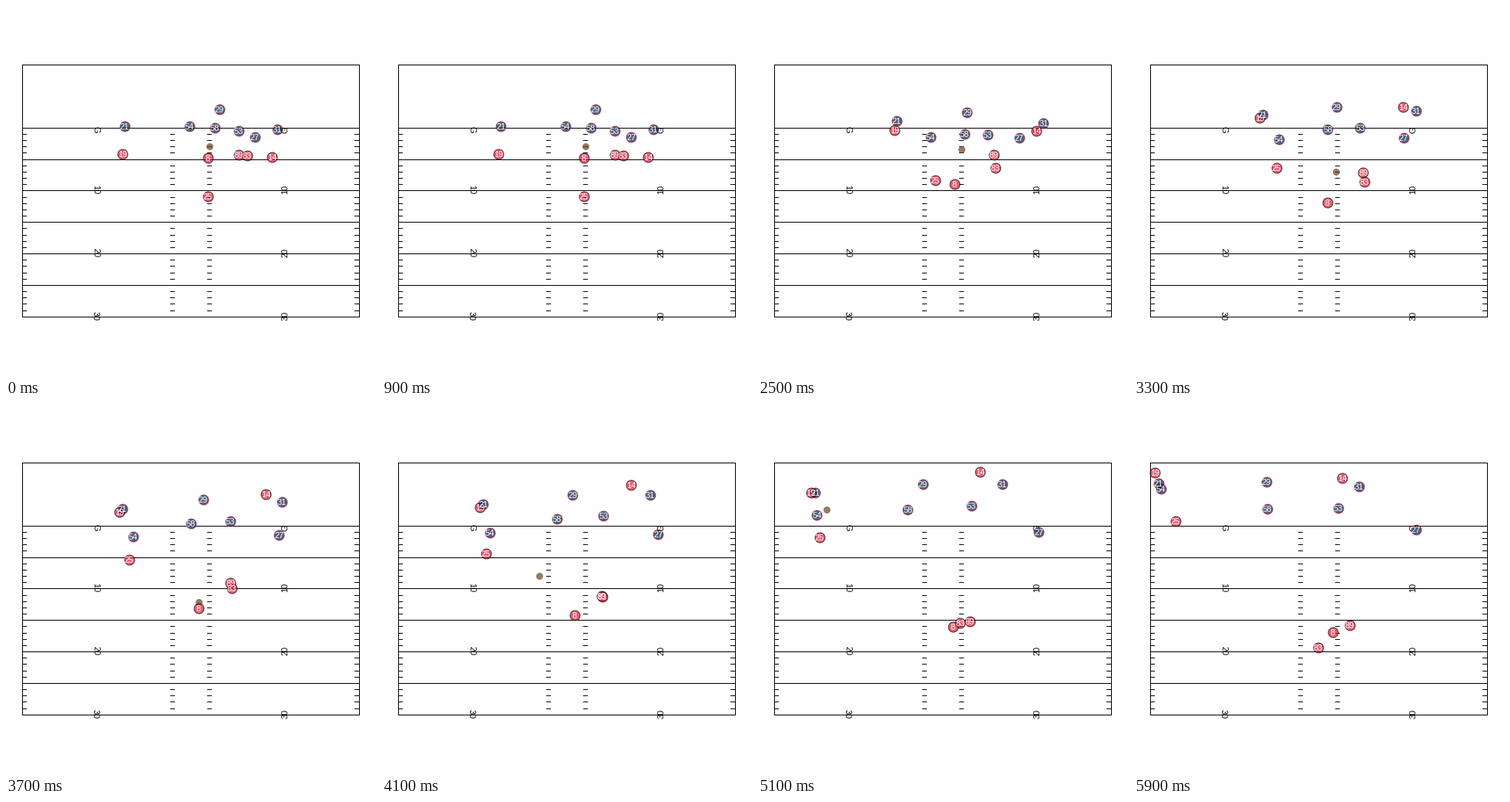
These frames come from a looping animation (480 px wide and 480 px high, 6000 ms). A matplotlib script:

```python
import numpy as np
import matplotlib.pyplot as plt
from matplotlib.animation import FuncAnimation

SIZE, DPI = 480, 100
FRAMES, INTERVAL = 60, 100
PX = 72 / DPI          # points per pixel
ALPHA = 0.7
FONT = dict(family="Liberation Sans", fontsize=11 * PX, ha="center", va="baseline")
CRISP = dict(antialiased=False, snap=False)

GOAL, YARD = 158.2, 245 / 30
LEFT, RIGHT, TOP = 21, 458, 76
SNAP = 16              # frame at which the play starts

# Each route is a curve through a few points, evenly spaced in time after the snap.
OFFENSE = {
    "14": [(345, 196), (355, 141), (310, 96), (270, 96)],
    "19": [(151, 192), (171, 150), (106, 128), (27, 89)],
    "25": [(262, 247), (201, 215), (113, 187), (54, 152)],
    "89": [(302, 193), (301, 207), (280, 263), (280, 287)],
    "83": [(313, 194), (292, 240), (239, 316)],
    "8": [(262, 197), (250, 266), (258, 296)],
}
DEFENSE = {
    "21": [(154, 156), (174, 144), (111, 125), (32, 103)],
    "27": [(323, 170), (355, 170), (366, 163)],
    "29": [(277, 134), (266, 134), (237, 112), (172, 101)],
    "31": [(352, 160), (369, 142), (337, 111), (292, 107)],
    "53": [(302, 162), (295, 162), (284, 139), (265, 135)],
    "54": [(238, 156), (202, 173), (116, 161), (35, 110)],
    "58": [(271, 158), (258, 163), (215, 144), (173, 136)],
}


def run(points):
    """Polynomial route; the clock rests before the snap and then starts softly."""
    t = np.arange(FRAMES)
    clock = 2 * np.log1p(np.exp((t - SNAP) / 2)) / (FRAMES - 1 - SNAP)
    knots = np.linspace(0, 1, len(points))
    coeffs = np.polyfit(knots, np.array(points, float), len(points) - 1)
    return np.column_stack([np.polyval(c, clock) for c in coeffs.T])


def throw():
    """Ball path: snapped back, thrown on a straight line, caught."""
    t = np.arange(FRAMES)
    times = [24, 33, 37, 51, 59]
    x = np.interp(t, times, [264, 262, 250, 89, 33])
    y = np.interp(t, times, [182, 215, 257, 137, 106])
    return np.column_stack([x, y])


def yard_y(yards):
    return np.floor(GOAL + YARD * np.asarray(yards)) + 0.5


fig = plt.figure(figsize=(SIZE / DPI, SIZE / DPI), dpi=DPI, facecolor="white")
ax = fig.add_axes([0, 0, 1, 1])
ax.set(xlim=(0, SIZE), ylim=(SIZE, 0))
ax.axis("off")


def draw_field():
    style = dict(colors="black", linewidth=PX, zorder=1, **CRISP)
    rows = np.append(yard_y(np.arange(0, 31, 5)), TOP + 0.5)
    ax.hlines(rows, LEFT, RIGHT + 1, **style)
    ax.vlines([LEFT + 0.5, RIGHT + 0.5], TOP, yard_y(30) + 0.5, **style)
    ticks = yard_y([n for n in range(30) if n % 5])
    for x in (LEFT, 213, 261, RIGHT - 6):
        ax.hlines(ticks, x, x + 6, **style)
    for yards in range(0, 31, 10):
        text = str(yards) if yards else "G"
        y = GOAL + YARD * yards + (-1.5 if yards else 2.5)
        for x, angle in ((113, -90), (365.5, 90)):
            ax.text(x, y, text, rotation=angle, rotation_mode="anchor",
                    zorder=2, **FONT)


def make_marker(size, fill, edge, zorder):
    return ax.plot([], [], "o", markersize=size * PX, markerfacecolor=fill,
                   markeredgecolor=edge, markeredgewidth=PX, alpha=ALPHA,
                   zorder=zorder, **CRISP)[0]


def make_team(team, fill, edge, zorder):
    for number, points in team.items():
        label = ax.text(0, 0, number, color="white", zorder=6, **FONT)
        marker = make_marker(13, fill, edge, zorder)
        players.append((marker, label, run(points)))


draw_field()
players = []
ball = make_marker(9, "#654321", "none", 3)
ball_path = throw()
make_team(OFFENSE, "#e31837", "black", 4)
make_team(DEFENSE, "#002244", "#c60c30", 5)


def update(frame):
    ball.set_data(*ball_path[frame][:, None])
    for marker, label, track in players:
        x, y = track[frame]
        marker.set_data([x], [y])
        label.set_position((x, y + 4))
    return [ball]


anim = FuncAnimation(fig, update, frames=FRAMES, interval=INTERVAL,
                     repeat=True, repeat_delay=0)
plt.show()
```
